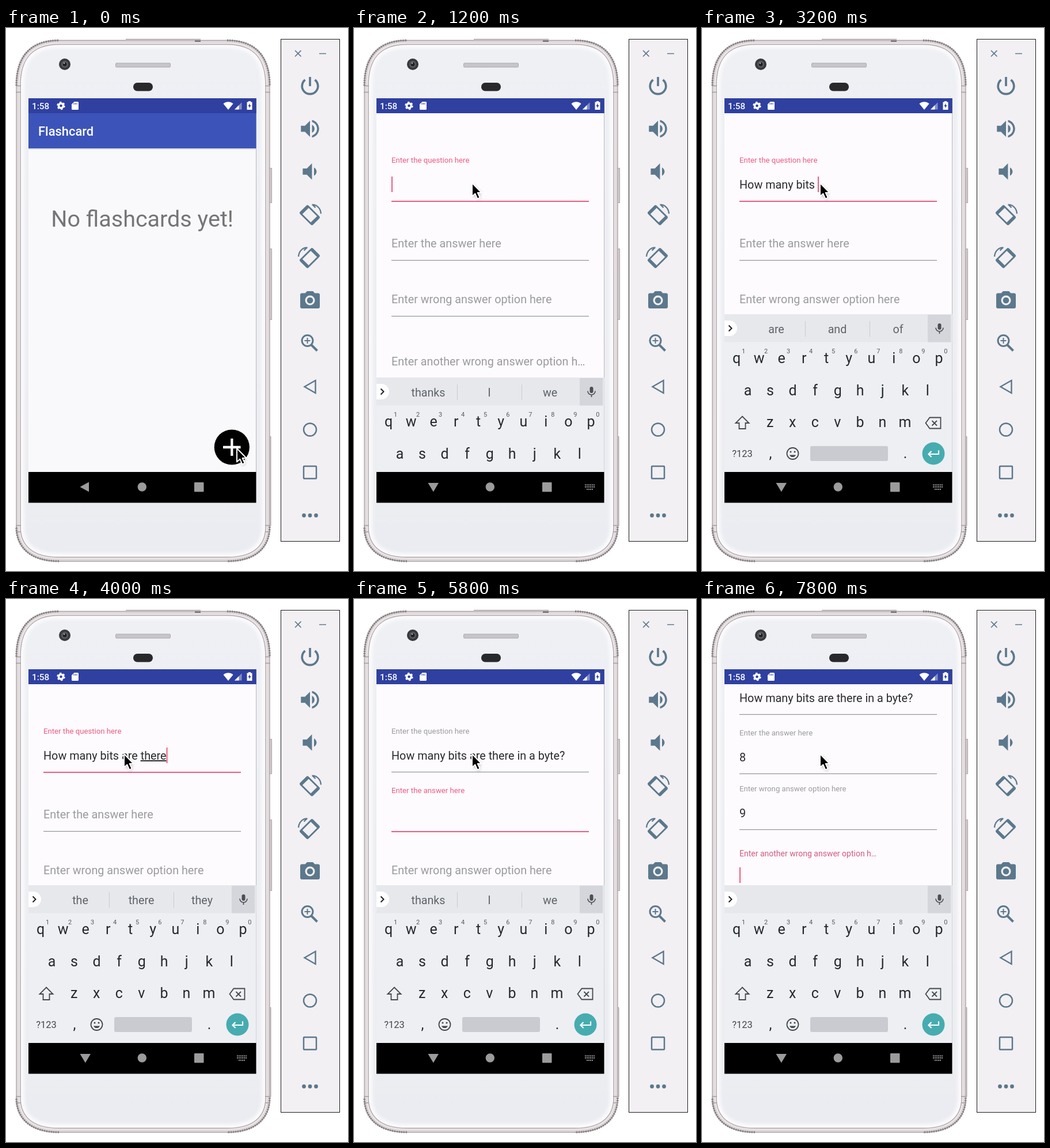
Animation, 594 px wide and 943 px high, one loop 8 s. Source, as an HTML page:

```html
<!DOCTYPE html>
<html lang="en">
<head>
<meta charset="utf-8">
<title>Flashcard app demo</title>
<style>
  html, body { margin: 0; width: 100%; height: 100%; overflow: hidden; background: #fff; }
  svg { display: block; width: 594px; height: 943px; }
  text { font-family: Roboto, sans-serif; white-space: pre; }
  .line { fill: none; stroke-linecap: butt; }
  .mid { text-anchor: middle; }
  .composing { text-decoration: underline 1px; text-underline-offset: 2px; }
</style>
</head>
<body>
<svg viewBox="0 0 594 943">
  <defs>
    <filter id="soft"><feGaussianBlur stdDeviation="2.5"/></filter>
    <clipPath id="screenClip"><rect x="39" y="122" width="395.500" height="649"/></clipPath>
    <clipPath id="contentClip"><rect x="39" y="148" width="395.500" height="623"/></clipPath>
    <linearGradient id="lid" x1="0" y1="0" x2="0" y2="1">
      <stop offset="0" stop-color="#eff0f4"/><stop offset="1" stop-color="#ebecf1"/>
    </linearGradient>
  </defs>

  <!-- phone -->
  <g fill="#d5cdd0" stroke="#a9a1a4">
    <path d="M456 243.500h5.500v60h-5.500zM456 383.500h5.500v123h-5.500zM456 709.500h4v155h-4z"/>
    <path d="M208 19.500H338" stroke="#8f888b"/>
  </g>
  <g id="body"></g>
  <path d="M328 22.500h10" stroke="#77777b" stroke-width="3"/>
  <path d="M17 100.500h9M17 111.500h9M450 100.500h9M450 111.500h9M17 864h9M17 875h9M450 864h9M450 875h9" stroke="#a59da0" stroke-width="1.500"/>
  <circle cx="102" cy="63" r="10" fill="#39393c"/>
  <circle cx="102" cy="63" r="6" fill="#5b5c61"/>
  <circle cx="102" cy="63" r="3.500" fill="#202226"/>
  <circle cx="101" cy="61" r="1.300" fill="#a8acb1"/>
  <rect x="190.500" y="61" width="95" height="7" rx="1.500" fill="#c6c5c9" stroke="#aaa9ae"/>
  <rect x="221" y="95" width="34" height="14.500" rx="7" fill="#29292c"/>

  <!-- screen -->
  <rect x="39" y="122" width="395.500" height="702.500"/>
  <g clip-path="url(#screenClip)">
    <g id="home">
      <rect x="39" y="148" width="396" height="623" fill="#f9f9fb"/>
      <rect x="39" y="209" width="396" height="2" fill="#d9dae2"/>
      <rect x="39" y="148" width="396" height="61" fill="#3c54b9"/>
      <text x="56" y="187" font-size="21.900" font-weight="500" fill="#fff">Flashcard</text>
      <text class="mid" x="236.700" y="345" font-size="39.500" fill="#757577">No flashcards yet!</text>
      <circle cx="392.300" cy="728" r="30.600"/>
      <path d="M377 728h30.500M392.300 713v30" stroke="#fff" stroke-width="4.300"/>
    </g>
    <g id="form">
      <rect x="39" y="148" width="396" height="623" fill="#fdfbfe"/>
      <g clip-path="url(#contentClip)"><g id="fields"></g></g>
      <circle cx="80.300" cy="728" r="30.600"/>
      <path d="M74 713h12.600v15h9L80.300 746 65 728h9z" fill="#fff"/>
      <circle cx="392.300" cy="728" r="30.600"/>
      <path d="M380 715.700l24.600 24.600m0-24.600l-24.600 24.600" stroke="#fff" stroke-width="6.600"/>
    </g>
    <g id="keyboard">
      <rect x="39" y="497" width="396" height="274" fill="#edeff3"/>
      <rect x="39" y="497" width="396" height="48.500" fill="#e6e8ec"/>
      <rect x="392" y="498" width="40" height="47.500" fill="#d5d6db"/>
      <path d="M39 508h8.500a13.500 13.500 0 0 1 0 27H39z" fill="#fff"/>
      <path class="line" d="M46.500 516.500l5 5-5 5" stroke="#222" stroke-width="2"/>
      <path id="dividers" d="M179.500 509v27M291.500 509v27" stroke="#c9cbd0"/>
      <rect x="409.500" y="513" width="6" height="11" rx="3" fill="#4b4f54"/>
      <path class="line" d="M406 520.500a6.500 6.500 0 0 0 13 0M412.500 527v4" stroke="#4b4f54" stroke-width="1.700"/>
      <g id="suggestions" class="mid" font-size="19.700" fill="#5f6368"></g>
      <g id="keys" class="mid" font-size="25" fill="#25292d"></g>
      <g class="line" stroke="#43474b" stroke-width="1.800">
        <path d="M70 674.500l11.500 11.500h-6v10h-11v-10h-6z"/>
        <path d="M395.500 676.500h19v19h-19l-7-9.500zM399.500 682l8.500 8.500m0-8.500l-8.500 8.500"/>
        <circle cx="157.500" cy="739" r="10"/>
        <path d="M152 741.500a6 6 0 0 0 11 0z" fill="#43474b" stroke="none"/>
      </g>
      <circle cx="154" cy="736" r="1.500" fill="#43474b"/><circle cx="161" cy="736" r="1.500" fill="#43474b"/>
      <rect x="188" y="726" width="135" height="26" rx="3" fill="#cacbd1"/>
      <circle cx="402" cy="739" r="19.500" fill="#46acb0"/>
      <path class="line" d="M411 733.500v6.500h-17M398.500 735l-5 5 5 5" stroke="#fff" stroke-width="2.200"/>
    </g>
    <rect x="39" y="122" width="396" height="26" fill="#2f40a0"/>
    <g fill="#fff">
      <text x="45" y="140.500" font-size="15.300" font-weight="500">1:58</text>
      <circle cx="95.500" cy="135" r="4" fill="none" stroke="#fff" stroke-width="3.500"/>
      <circle cx="95.500" cy="135" r="6.100" fill="none" stroke="#fff" stroke-width="2.200" stroke-dasharray="3.200 3.190"/>
      <path d="M118.500 128h6a1.500 1.500 0 0 1 1.500 1.500v11a1.500 1.500 0 0 1-1.500 1.500h-9a1.500 1.500 0 0 1-1.500-1.500v-8z"/>
      <path d="M118 130v3m2.500-3v3m2.500-3v3" stroke="#2f40a0"/>
      <path d="M377.500 131.500a13 13 0 0 1 17 0L386 142z"/>
      <path d="M409.500 129v12.500H397z" opacity=".4"/><path d="M404.500 134v7.500H397z"/>
      <path d="M421 127h4v1.500h2.500V142h-9v-13.500h2.500z"/>
      <path d="M423.500 130.500l-3 5.500h2v3.500l3-5.500h-2z" fill="#2f40a0"/>
    </g>
  </g>
  <g fill="#9b9b9c">
    <path id="navBack"/>
    <circle cx="236.300" cy="797" r="7.700"/>
    <rect x="327" y="789" width="16.500" height="16.500" rx="1"/>
    <path id="navKeys" d="M401 793.500h17M401 797h17M404 801h11" stroke="#9b9b9c" stroke-width="2" stroke-dasharray="2 1"/>
  </g>

  <!-- emulator toolbar -->
  <rect x="477.500" y="19.500" width="102" height="872" fill="#f2f0f3" stroke="#1b1b1d"/>
  <g id="tools" fill="none" stroke="#5c788c" stroke-width="3">
    <path d="M502 39l10.500 10.500m0-10.500L502 49.500M544 44.500h12" stroke-width="1.700"/>
    <path d="M519.500 90a13.800 13.800 0 1 0 17 0M528 85v16" stroke-width="3.700"/>
    <g fill="#5c788c" stroke="none">
      <path transform="translate(507 154) scale(1.750)" d="M3 9v6h4l5 5V4L7 9H3zm13.500 3c0-1.770-1.020-3.290-2.500-4.030v8.050c1.480-.730 2.500-2.250 2.500-4.020zM14 3.230v2.060c2.890.860 5 3.540 5 6.710s-2.110 5.850-5 6.710v2.060c4.010-.910 7-4.490 7-8.770s-2.990-7.860-7-8.770z"/>
      <path transform="translate(506.500 228) scale(1.780)" d="M18.500 12c0-1.770-1.020-3.290-2.500-4.030v8.050c1.480-.730 2.500-2.250 2.500-4.020zM5 9v6h4l5 5V4L9 9H5z"/>
      <path d="M523 457h10l3.500 3.500h5.500a3 3 0 0 1 3 3V484a3 3 0 0 1-3 3h-28a3 3 0 0 1-3-3v-20.500a3 3 0 0 1 3-3h5.500z"/>
      <circle cx="528" cy="473" r="8.500" fill="#f2f0f3"/><circle cx="528" cy="473" r="5.300"/>
      <circle cx="517.500" cy="846.500" r="3.400"/><circle cx="528" cy="846.500" r="3.400"/><circle cx="538.500" cy="846.500" r="3.400"/>
    </g>
    <g id="rotate">
      <g transform="rotate(45)">
        <rect x="-14.500" y="-9" width="29" height="18" rx="1.500" stroke-width="2.800"/>
        <path d="M-12.500 -9v18M12.500 -9v18" stroke-width="4.500"/>
      </g>
      <path d="M4 -18C12 -18.500 19 -12 19.500 -2.500M5 -18l5 5" stroke-width="2.300"/>
    </g>
    <circle cx="523.500" cy="543" r="9.500"/>
    <path d="M530 550l10.500 10.500" stroke-width="4"/>
    <path d="M518.500 543h10m-5-5v10" stroke-width="2"/>
    <path d="M537.500 612v22l-19-11z" stroke-width="2.400"/>
    <circle cx="528" cy="697.500" r="11" stroke-width="2.500"/>
    <rect x="517" y="761" width="22" height="21.500" rx="1" stroke-width="2.500"/>
  </g>

  <g id="pointer" stroke-linejoin="round">
    <path d="M2 4V27l5-4.500 4 9 4.500-2-4-8.500H18z" opacity=".3" filter="url(#soft)"/>
    <path d="M1 2V25.500l5.300-4.800 4 9 4.400-2-4-8.700H17.500z" stroke="#fff" stroke-width="2"/>
  </g>
</svg>

<script>
const STEP = 200, STEPS = 40;
const PINK = '#ee5b80', GREY = '#9b9a9e';
const $ = id => document.getElementById(id);

function add(parent, tag, attrs = {}, text = '') {
  const el = document.createElementNS('http://www.w3.org/2000/svg', tag);
  set(el, attrs);
  el.textContent = text;
  return parent.appendChild(el);
}
function set(el, attrs) {
  for (const key in attrs) el.setAttribute(key, attrs[key]);
}
const show = (el, on) => { el.style.display = on ? '' : 'none'; };

// Linear interpolation through [step, value] pairs.
function track(points, step) {
  const i = points.findIndex(p => p[0] > step);
  if (i < 0) return points[points.length - 1][1];
  if (i === 0) return points[0][1];
  const [a, from] = points[i - 1], [b, to] = points[i];
  return from + (to - from) * (step - a) / (b - a);
}

// Phone shell: nested outlines of the same shape.
function shell(inset) {
  const l = 18 + inset, r = 458 - inset, t = 21.5 + inset, b = 926 - inset;
  return `M${l} 100C${l} ${52 + inset / 2} ${40 + inset / 2} ${t} 92 ${t}H384` +
    `C${436 - inset / 2} ${t} ${r} ${52 + inset / 2} ${r} 100V866` +
    `C${r} ${900 - inset / 2} ${436 - inset / 2} ${b} 384 ${b}H92` +
    `C${40 + inset / 2} ${b} ${l} ${900 - inset / 2} ${l} 866Z`;
}
const corners = 'M18 100C18 52 40 21.500 92 21.500M384 21.500C436 21.500 458 52 458 100' +
  'M458 866C458 900 436 926 384 926M92 926C40 926 18 900 18 866';
add($('body'), 'path', { d: shell(0), fill: '#e6dfe1', stroke: '#a69ea1', 'stroke-width': 1.3 });
add($('body'), 'path', { d: corners, fill: 'none', stroke: '#a09a9c', 'stroke-width': 2 });
add($('body'), 'path', { d: corners, fill: 'none', stroke: '#858083', 'stroke-width': 3.4, 'stroke-dasharray': '2 2' });
add($('body'), 'path', { d: shell(3), fill: '#ece6e8', stroke: '#d3cbce' });
add($('body'), 'path', { d: shell(7), fill: '#fafafc', stroke: '#b0a8ab', 'stroke-width': 1.4 });
add($('body'), 'path', { d: shell(14), fill: 'url(#lid)', filter: 'url(#soft)' });

// Keyboard letters
const keyRow = (letters, x, y) => [...letters].forEach((c, i) =>
  add($('keys'), 'text', { x: x + i * 39.05, y }, c));
keyRow('qwertyuiop', 60, 582);
keyRow('asdfghjkl', 79.5, 637.5);
keyRow('zxcvbnm', 118.2, 693);
[...'1234567890'].forEach((c, i) =>
  add($('keys'), 'text', { x: 72 + i * 39.05, y: 565, 'font-size': 11, fill: '#55595e' }, c));
add($('keys'), 'text', { x: 70, y: 745, 'font-size': 16.5, fill: '#43474b' }, '?123');
add($('keys'), 'text', { x: 119, y: 747 }, ',');
add($('keys'), 'text', { x: 353, y: 747 }, '.');
const suggestions = [129, 235, 340.5].map(x => add($('suggestions'), 'text', { x, y: 529.5 }));

// Emulator rotate buttons
const rotate = $('rotate'), mirrored = rotate.cloneNode(true);
rotate.after(mirrored);
set(rotate, { transform: 'translate(527.5 325)' });
set(mirrored, { transform: 'translate(527.5 399.5) scale(-1 1)' });

// Form fields: typed maps a step to the number of characters entered.
const fields = [
  { hint: 'Enter the question here', line: 300.5, focus: 5, text: 'How many bits are there in a byte?',
    typed: [[6, 0], [9, 3], [16, 14], [24, 32], [26, 34]] },
  { hint: 'Enter the answer here', line: 403.5, focus: 27, text: '8', typed: [[30, 0], [31, 1]] },
  { hint: 'Enter wrong answer option here', line: 500.5, focus: 33, text: '9', typed: [[35, 0], [36, 1]] },
  { hint: 'Enter another wrong answer option h…', line: 608.5, focus: 39, text: '', typed: [[0, 0]] },
];
for (const f of fields) {
  f.label = add($('fields'), 'text', { x: 65 }, f.hint);
  f.value = add($('fields'), 'text', { x: 65, y: f.line - 21.5, 'font-size': 19.8, fill: '#2a292c' });
  f.rule = add($('fields'), 'rect', { x: 65, width: 343 });
}
const caret = add($('fields'), 'rect', { width: 2, height: 27, fill: PINK });

// Word suggestions, from the given number of typed characters on
const questionWords = [
  [0, 'thanks|I|we'], [1, 'Hi|Hey|How'], [3, 'How|How many|How are'], [4, 'are|do|is'],
  [5, 'many|much|my'], [9, 'people|of|times'], [10, 'bits|but|be'], [14, 'are|and|of'],
  [15, 'are|are you|area'], [18, 'you|the|there'], [19, 'the|there|they'], [24, 'in|any|a'],
  [25, 'in|in the|I'], [27, 'the|a|my'], [29, 'day|few|lot'], [30, 'b|bit|by'],
  [32, 'byt|*bit|bit to'], [33, 'byte|bytes|byte to'], [34, '||'],
];
function suggest(index, count) {
  if (index === 3) return '||';
  if (index === 0) return questionWords.filter(w => w[0] <= count).pop()[1];
  return count ? '||' : 'thanks|I|we';
}

const pointerX = [[0, 400], [1, 390], [2, 323], [3, 262], [4, 212], [5, 204]];
const pointerY = [[0, 728], [1, 705], [2, 557], [3, 400], [4, 285], [5, 267]];

function drawField(f, step, focused) {
  const count = Math.floor(track(f.typed, step) + 1e-6);
  const text = f.text.slice(0, count);
  const float = step < f.focus ? 0 : step === f.focus ? 0.877 : 1;
  set(f.label, {
    y: f.line - 22.5 - 44.5 * float,
    'font-size': 19.8 - 6.6 * float,
    fill: !focused ? GREY : float < 1 ? '#d6587f' : PINK,
  });
  const composing = focused ? text.match(/[a-z]*$/i)[0] : '';
  f.value.textContent = text.slice(0, text.length - composing.length);
  if (composing) add(f.value, 'tspan', { class: 'composing' }, composing);
  set(f.rule, {
    y: focused ? f.line - 0.5 : f.line - 0.6,
    height: focused ? 2 : 1.2,
    fill: focused ? PINK : '#939296',
  });
  return count;
}

function draw(step) {
  const active = fields.findLastIndex(f => step >= f.focus);
  const counts = fields.map((f, i) => drawField(f, step, i === active));
  const typing = active >= 0;

  show($('home'), step < 1);
  show($('form'), step >= 1);
  set($('fields'), { transform: `translate(0 ${active === 3 ? -100 : 0})` });

  show(caret, typing);
  if (typing) {
    const f = fields[active];
    const lastEdit = Math.max(f.focus, Math.min(step, f.typed[f.typed.length - 1][0]));
    const idle = step < f.typed[0][0] ? step - f.focus : step - lastEdit;
    show(caret, idle % 5 < 2);
    const width = counts[active] ? f.value.getComputedTextLength() : 0;
    set(caret, { x: 65 + width, y: f.line - 42.5 });

    const words = suggest(active, counts[active]).split('|');
    suggestions.forEach((el, i) => {
      const strong = words[i].startsWith('*');
      el.textContent = words[i].replace('*', '');
      set(el, { 'font-weight': strong ? 700 : 400, fill: strong ? '#111' : '#5f6368' });
    });
    show($('dividers'), words[0] !== '');
  }

  const keyboardUp = step >= 6;
  show($('keyboard'), keyboardUp);
  set($('keyboard'), { transform: `translate(0 ${track([[6, 110], [7, 0]], step)})` });
  show($('navKeys'), keyboardUp);
  set($('navBack'), { d: keyboardUp ? 'M128.500 790h18.500l-9.200 15.500z' : 'M128.500 797l15.500-8.500v17z' });
  set($('pointer'), { transform: `translate(${track(pointerX, step)} ${track(pointerY, step)})` });
}

let shown = -1;
function tick() {
  const step = Math.floor(performance.now() / STEP) % STEPS;
  if (step !== shown) draw(shown = step);
  requestAnimationFrame(tick);
}
tick();
</script>
</body>
</html>
```
